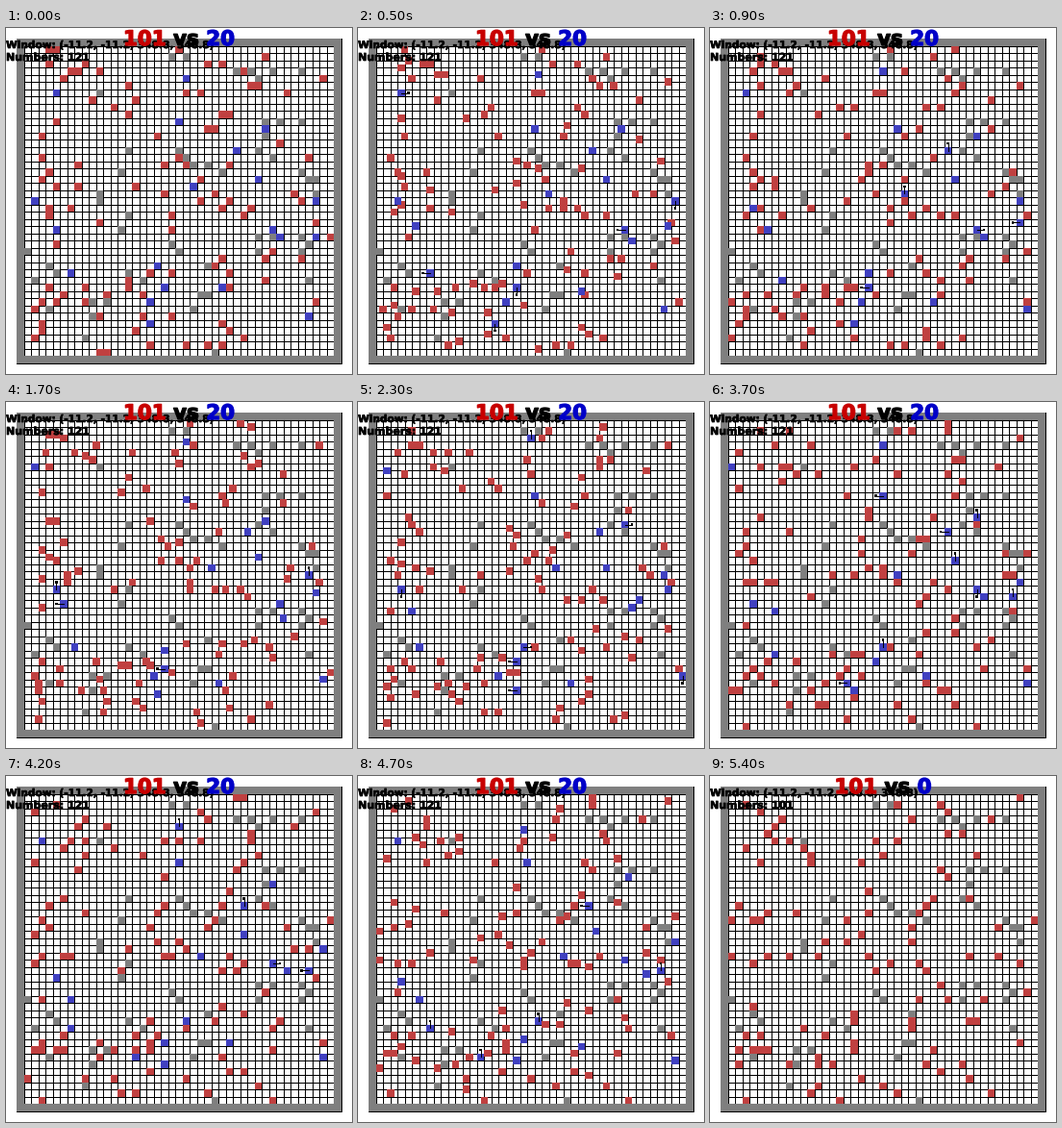
Write a matplotlib script that moves like this. It is 360 px wide and 360 px high and loops after 10 s.

```python
import random

import matplotlib.pyplot as plt
import matplotlib.patheffects as pe
import numpy as np
from matplotlib.animation import FuncAnimation

SIZE, CELL, EDGE, N = 360, 7.5, 11.25, 45
TURNS, HERD = 18, 101
RED, BLUE, GRAY = (192, 64, 64), (64, 64, 192), (127, 127, 127)
STEPS = [(1, 0), (-1, 0), (0, 1), (0, -1)]
rng = random.Random(7)

# row: columns of the fixed rocks
ROCKS = {
    2: (21, 23), 4: (30, 32, 35, 39), 5: (33,), 7: (11,), 11: (34, 36, 39),
    13: (34,), 15: (15, 22, 33), 16: (23, 35), 17: (24, 26),
    18: (14, 28, 39), 19: (40, 41), 21: (11, 41), 22: (11,), 24: (15,),
    26: (14,), 27: (33, 35, 39), 28: (21, 40), 29: (1, 22, 33, 39),
    31: (4, 26), 32: (5, 15), 33: (2, 17, 40), 35: (25, 26), 36: (10, 12),
    37: (4, 24), 38: (10,), 41: (9,), 43: (27,),
}
# starting cells of the hunters
HUNTERS = [
    (5, 7), (23, 5), (22, 11), (34, 12), (30, 15), (24, 20), (33, 19),
    (2, 22), (5, 26), (41, 22), (35, 26), (36, 27), (41, 27), (19, 31),
    (7, 32), (20, 34), (28, 34), (18, 36), (18, 39), (40, 38),
]

walls = {(c, r) for r, cols in ROCKS.items() for c in cols}
for k in range(N):
    walls |= {(k, 0), (k, N - 1), (0, k), (N - 1, k)}


def shift(p, step):
    return p[0] + step[0], p[1] + step[1]


def wander(path, taken, rest):
    """Add one turn: stay put, or step to a free neighbour."""
    here = path[-1]
    free = [q for q in (shift(here, s) for s in STEPS) if q not in taken]
    if free and rng.random() > rest:
        taken.remove(here)
        here = rng.choice(free)
        taken.add(here)
    path.append(here)


inner = [(x, y) for x in range(1, N - 1) for y in range(1, N - 1)]
open_cells = [p for p in inner if p not in walls and p not in HUNTERS]
reds = [[p] for p in rng.sample(open_cells, HERD)]
blues = [[p] for p in HUNTERS]

# a hunter that stays put mostly strikes a neighbouring cell
strikes = [[] for _ in range(TURNS + 1)]
taken = walls | {path[0] for path in reds + blues}
for turn in range(1, TURNS + 1):
    for path in reds:
        wander(path, taken, 0.15)
    for path in blues:
        wander(path, taken, 0.35)
        if turn < TURNS and path[-1] == path[-2] and rng.random() < 0.85:
            strikes[turn].append((path[-1], rng.choice(STEPS)))


def px(v):
    return round(EDGE + CELL * v)


def block(img, x, y, color, size=1):
    img[px(y):px(y + size), px(x):px(x + size)] = color


def make_board():
    img = np.full((SIZE, SIZE, 3), 255, np.uint8)
    span = slice(px(0), px(N) + 1)
    for k in range(N + 1):
        img[px(k), span] = 0
        img[span, px(k)] = 0
    for x, y in walls:
        block(img, x, y, GRAY)
    return img


def draw_strike(img, pos, step):
    x, y = shift(pos, (0.5, 0.5))
    tx, ty = shift((x, y), step)
    xs, ys = sorted((px(x), px(tx))), sorted((px(y), px(ty)))
    img[ys[0]:ys[1] + 1, xs[0]:xs[1] + 1] = 0
    block(img, tx - 0.15, ty - 0.15, 0, 0.3)


board = make_board()
fig = plt.figure(figsize=(3.6, 3.6), dpi=100, facecolor="white")
ax = fig.add_axes([0, 0, 1, 1])
pic = ax.imshow(board, extent=(0, SIZE, SIZE, 0), interpolation="nearest")
ax.set_xlim(0, SIZE)
ax.set_ylim(SIZE, 0)
ax.axis("off")


def label(y, text, size, color="black"):
    heavy = pe.withStroke(linewidth=0.045 * size, foreground=color)
    return ax.text(0, y, text, fontsize=size * 0.72, color=color,
                   family="DejaVu Sans", weight="bold", va="baseline",
                   path_effects=[heavy])


BIG = 21.4
label(21, "Window: (-11.2, -11.2, 348.8, 348.8)", 10.6)
total = label(34, "", 11)
banner = [label(18, "101", BIG, "#c80000"), label(18, "vs", BIG),
          label(18, "", BIG, "#0000c8")]


def write_counts(n):
    total.set_text(f"Numbers: {HERD + n}")
    banner[2].set_text(str(n))
    # advance widths of the typeface
    digit, space, vs = 0.696 * BIG, 0.348 * BIG, 1.247 * BIG
    widths = 3 * digit, vs, len(str(n)) * digit
    x = (SIZE - sum(widths) - 2 * space) / 2
    for part, width in zip(banner, widths):
        part.set_x(x)
        x += width + space


def draw(k):
    # three pictures a turn: before, halfway, after
    turn, phase = divmod(min(k, 3 * TURNS) + 2, 3)
    rate = phase / 2
    alive = blues if turn < TURNS else []
    img = board.copy()
    for group, color in ((reds, RED), (alive, BLUE)):
        for path in group:
            (x0, y0), (x1, y1) = path[max(turn - 1, 0)], path[turn]
            block(img, x0 + (x1 - x0) * rate, y0 + (y1 - y0) * rate, color)
    for pos, step in strikes[turn]:
        draw_strike(img, pos, step)
    pic.set_data(img)
    write_counts(len(alive))
    return [pic, total, *banner]


anim = FuncAnimation(fig, draw, frames=100, interval=100,
                     init_func=lambda: draw(0), repeat=True, repeat_delay=0)
plt.show()
```
